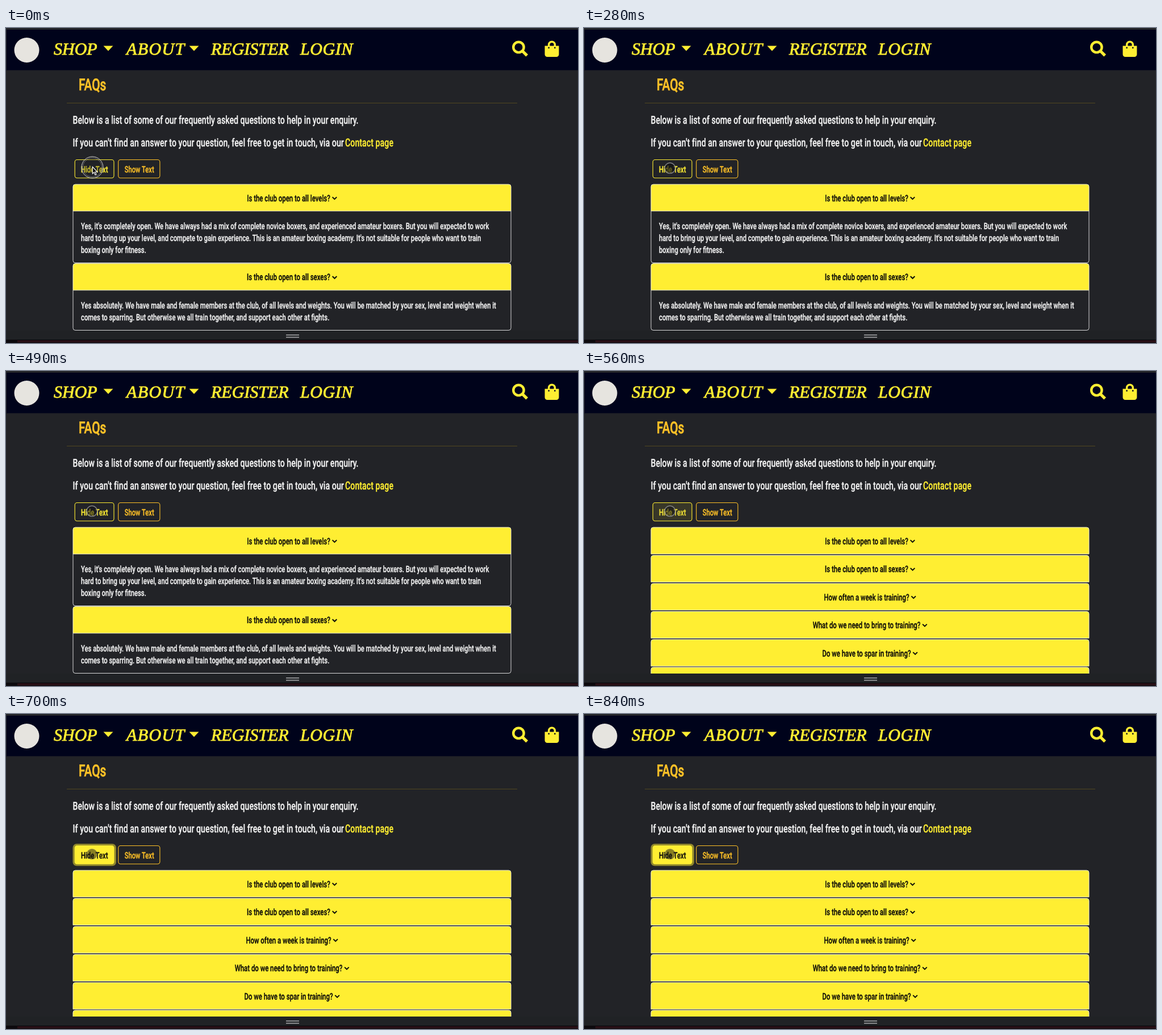
These frames come from a looping animation (1007x556 px, 0.91 s). An HTML page:

```html
<!DOCTYPE html>
<html lang="en">
<head>
<meta charset="utf-8">
<title>FAQs</title>
<style>
  html, body { margin: 0; width: 100%; height: 100%; overflow: hidden; background: #222327; }
  svg { display: block; width: 1007px; height: 556px; }
  text { font-family: Roboto, "Liberation Sans", sans-serif; font-weight: 500; text-rendering: geometricPrecision; white-space: pre;
    fill: currentColor; stroke: currentColor; stroke-width: .35; }
  .nav { font: italic 400 30px "Liberation Serif", "Noto Serif", serif; color: #ffee32; stroke-width: .9; }
</style>
</head>
<body>
<svg id="stage" viewBox="0 0 1007 556" xmlns="http://www.w3.org/2000/svg"></svg>
<script>
const LOOP = 910, NARROW = 0.72;
const YELLOW = '#ffee32', AMBER = '#ffc127', INK = '#0b0b08', PAGE = '#222327', LIGHT = '#f3f3f3';
const stage = document.getElementById('stage');

function add(tag, attrs, parent = stage) {
  const el = document.createElementNS('http://www.w3.org/2000/svg', tag);
  for (const k in attrs) el.setAttribute(k, attrs[k]);
  parent.append(el);
  return el;
}
const rect = (x, y, width, height, fill, parent, more) =>
  add('rect', { x, y, width, height, fill, ...more }, parent);
const path = (d, attrs, parent) => add('path', { d, fill: 'none', ...attrs }, parent);

// condensed label, one ratio for the whole face
function label(str, x, y, size, color, parent, more) {
  const el = add('text', {
    transform: `translate(${x} ${y}) scale(${NARROW} 1)`, 'font-size': size, color, ...more
  }, parent);
  el.textContent = str;
  return el;
}

// hard steps: [[ms, value], ...]
function play(el, prop, steps) {
  const frames = steps.map(([ms, v]) => ({ offset: ms / LOOP, [prop]: v, easing: 'step-end' }));
  frames.push({ offset: 1, [prop]: steps[steps.length - 1][1] });
  el.animate(frames, { duration: LOOP, iterations: Infinity });
}

function header() {
  rect(0, 0, 1007, 3, '#242529');
  rect(0, 3, 1007, 71.5, '#00031b');
  rect(0, 3, 1, 71.5, '#25262b');
  add('circle', { cx: 36.5, cy: 39, r: 22, fill: '#e6e4df' });
  [['SHOP', 84, 0], ['ABOUT', 212, 1.4], ['REGISTER', 361, 0], ['LOGIN', 518, .6]].forEach(([s, x, gap]) => {
    add('text', { class: 'nav', x, y: 47, 'letter-spacing': gap }).textContent = s;
  });
  for (const x of [171.5, 322.5]) path(`M${x} 31.5h17l-8.5 9z`, { fill: YELLOW });

  add('circle', { cx: 902.4, cy: 33.9, r: 9.2, fill: 'none', stroke: YELLOW, 'stroke-width': 4.4 });
  path('M909.5 41L917.2 48.7', { stroke: YELLOW, 'stroke-width': 5.2 });
  path('M352 160v-32a128 128 0 0 0-256 0v32H0v272a80 80 0 0 0 80 80h288a80 80 0 0 0 80-80V160z' +
    'M160 128a64 64 0 0 1 128 0v32H160z' +
    'M320 200a24 24 0 0 0 0 48a24 24 0 0 0 0-48zM128 200a24 24 0 0 0 0 48a24 24 0 0 0 0-48z',
    { fill: YELLOW, 'fill-rule': 'evenodd', transform: 'translate(948.5 22.5) scale(.0556)' });
}

function intro() {
  label('FAQs', 128, 110, 29, AMBER, stage, { style: 'stroke-width: .7' });
  rect(107, 132, 793, 1, '#514720');
  label('Below is a list of some of our frequently asked questions to help in your enquiry.', 117.5, 169.3, 19.6, LIGHT);
  label("If you can't find an answer to your question, feel free to get in touch, via our", 117.5, 209.3, 19.6, LIGHT,
    stage, { 'letter-spacing': .1 });
  label('Contact page', 597, 209.3, 19.6, YELLOW, stage, { 'letter-spacing': .1 });
}

function question(str, y, parent) {
  path(`M118 ${y + 47.4}v-43a4 4 0 0 1 4-4h763a4 4 0 0 1 4 4v43z`, { fill: YELLOW, stroke: '#f3f0cf' }, parent);
  const text = label(str, 497.5, y + 30, 15.85, INK, parent, { 'text-anchor': 'middle' });
  const x = 497.5 + text.getComputedTextLength() * NARROW / 2 + 7.6;
  path(`M${x - 3.8} ${y + 22.8}l3.8 3.8l3.8 -3.8`, { stroke: INK, 'stroke-width': 2 }, parent);
}

function answer(lines, top, bottom, parent) {
  path(`M118 ${top}V${bottom - 4}a4 4 0 0 0 4 4H885a4 4 0 0 0 4-4V${top}`, { stroke: '#d9d9da' }, parent);
  lines.forEach((s, i) => label(s, 132, top + 31.5 + 21 * i, 15.62, LIGHT, parent));
}

function cards() {
  const asked = ['Is the club open to all levels?', 'Is the club open to all sexes?', 'How often a week is training?',
    'What do we need to bring to training?', 'Do we have to spar in training?', ''];
  const open = add('g', {}), shut = add('g', {});
  answer(["Yes, it's completely open. We have always had a mix of complete novice boxers, and experienced amateur boxers. But you will expected to work",
    "hard to bring up your level, and compete to gain experience. This is an amateur boxing academy. It's not suitable for people who want to train",
    'boxing only for fitness.'], 323, 414.5, open);
  answer(['Yes absolutely. We have male and female members at the club, of all levels and weights. You will be matched by your sex, level and weight when it',
    'comes to sparring. But otherwise we all train together, and support each other at fights.'], 463, 533.5, open);
  question(asked[0], 275.6, open);
  question(asked[1], 415.4, open);
  asked.forEach((s, i) => {
    const y = 275.6 + 49.5 * i;
    if (s) question(s, y, shut);
    else path(`M118 540v-13a4 4 0 0 1 4-4h763a4 4 0 0 1 4 4v13z`, { fill: YELLOW, stroke: '#f3f0cf' }, shut);
  });
  play(open, 'opacity', [[0, 1], [560, 0]]);
  play(shut, 'opacity', [[0, 0], [560, 1]]);
}

function buttons() {
  const halo = rect(117.5, 229, 76.5, 39.3, 'rgba(255,238,50,.5)', stage, { rx: 7 });
  const fill = rect(121.2, 232.5, 68.8, 32.2, YELLOW, stage, { rx: 4 });
  rect(121.2, 232.5, 68.8, 32.2, 'none', stage, { rx: 4, stroke: YELLOW, 'stroke-width': 1.1 });
  rect(197.7, 232.5, 73.2, 32.2, 'none', stage, { rx: 4, stroke: AMBER, 'stroke-width': 1.1 });
  const hide = label('Hide Text', 132, 254.5, 15.6, YELLOW);
  label('Show Text', 208.7, 254.5, 15.6, AMBER);
  play(halo, 'opacity', [[0, 0], [630, .75], [700, 1]]);
  play(fill, 'opacity', [[0, 0], [560, .1], [630, .75], [700, 1]]);
  play(hide, 'color', [[0, YELLOW], [560, '#efe035'], [630, '#504c24'], [700, INK]]);
}

function pointer() {
  const ring = add('g', { fill: 'none', stroke: '#d4d4d4' });
  add('circle', { cx: 152, cy: 246, r: 19, 'stroke-width': 1, fill: 'rgba(34,35,39,.25)' }, ring);
  add('circle', { cx: 152, cy: 246, r: 16.8, 'stroke-width': .7, 'stroke-opacity': .6 }, ring);
  const arrow = path('M152.3 245v12.2l2.7-2.5 2 4.6 2-.9-2-4.4h3.8z', { fill: '#111', stroke: '#fff', 'stroke-width': 1.1 });
  const press = add('g', {});
  const dot = add('circle', { cx: 151.3, cy: 247.3, r: 9.3, fill: '#101114' }, press);
  const rim = add('circle', { cx: 151.3, cy: 247.3, r: 9.3, fill: 'none', stroke: '#8d8e90', 'stroke-width': 1.5 }, press);
  play(ring, 'opacity', [[0, 1], [70, 0]]);
  play(arrow, 'opacity', [[0, 1], [280, 0]]);
  play(press, 'opacity', [[0, 0], [280, 1]]);
  play(dot, 'opacity', [[0, .65], [350, .5]]);
  play(rim, 'opacity', [[0, .9], [630, .3], [700, .2]]);
}

function footer() {
  rect(0, 534, 1007, 16, '#202225');
  rect(0, 550, 1007, 6, '#0d0a0e');
  rect(20, 552, 987, 1, '#4b1720');
  rect(20, 553, 987, 3, '#1b0d12');
  for (const y of [541, 545]) rect(493, y, 23, 1.6, '#a3a4a6');
}

rect(0, 0, 1007, 556, PAGE);
header();
intro();
cards();
buttons();
pointer();
footer();
</script>
</body>
</html>
```
